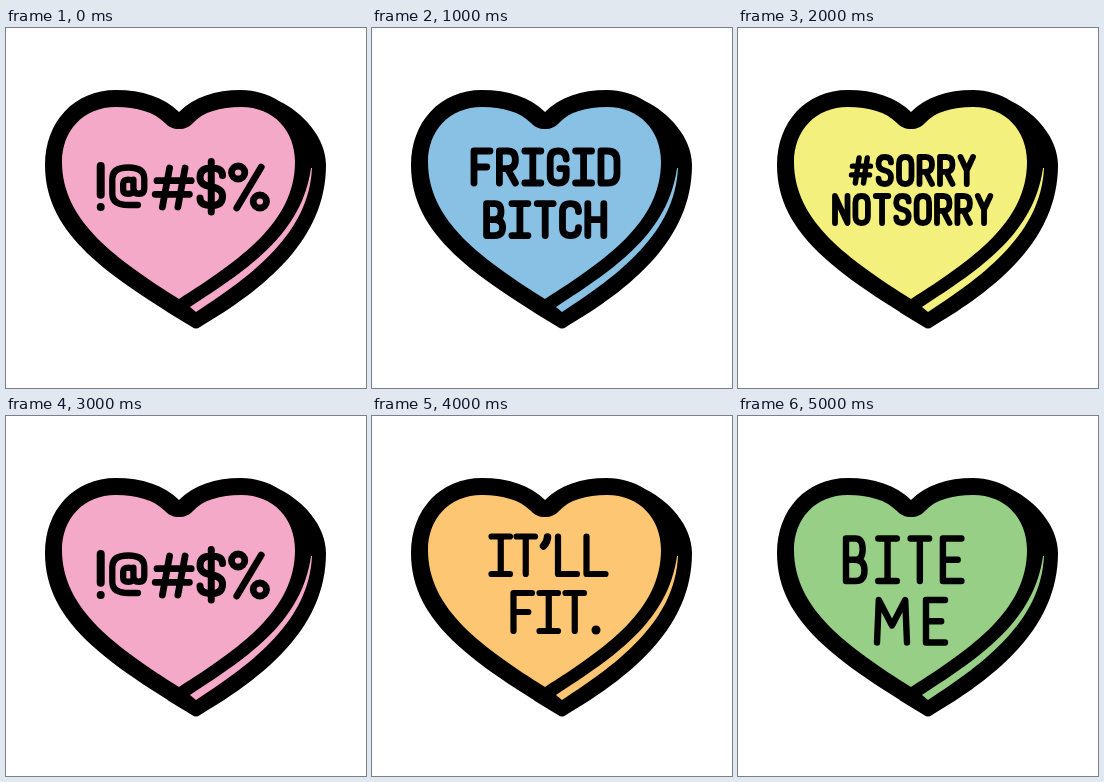
An HTML page for the animation above (6 s loop, 360 by 360 pixels).

```html
<!DOCTYPE html>
<html lang="en">
<head>
<meta charset="utf-8">
<title>Candy hearts</title>
<style>
  html, body { margin: 0; width: 100%; height: 100%; overflow: hidden; background: #fff; }
  svg { display: block; width: 100%; height: 100%; }
  #words path { fill: none; stroke: #000; stroke-linecap: round; stroke-linejoin: round; vector-effect: non-scaling-stroke; }
</style>
</head>
<body>
<svg viewBox="0 0 360 360" role="img">
  <path d="M173 84C188 69 209 62 235 62C249 62 262 66 273 73C296 84 320 109 320 137C320 211 260 260 194 299Q190 302 186 299C105 249 39 208 39 137C39 94 68 62 110 62C136 62 158 69 173 84Z"/>
  <g id="candy">
    <path d="M173 101C167 101 163 99 159 95C148 84 131 79 110 79C77 79 56 103 56 134C56 194 112 232 173 271C234 232 289 194 289 134C289 103 268 79 235 79C214 79 197 84 187 95C183 99 179 101 173 101Z"/>
    <path d="M184 279L190 284C249 246 303 204 306 140H305C296 204 246 239 184 279Z"/>
  </g>
  <g id="words"></g>
</svg>
<script>
// Rounded single-line alphabet; each letter fills a 10 by 20 box.
const S = 'M10 4Q10 0 5 0T0 5Q0 9 5 10T10 15Q10 20 5 20T0 16';
const glyphs = {
  B: 'M0 10H5Q10 10 10 15T5 20H0V0H5Q9 0 9 5T5 10',
  C: 'M10 5Q10 0 5 0T0 5V15Q0 20 5 20T10 15',
  D: 'M0 0V20H4Q10 20 10 14V6Q10 0 4 0Z',
  E: 'M10 0H0V20H10M0 10H8',
  F: 'M0 20V0H10M0 10H8',
  G: 'M10 5Q10 0 5 0T0 5V15Q0 20 5 20T10 15V11H6',
  H: 'M0 0V20M10 0V20M0 10H10',
  I: 'M0 0H10M0 20H10M5 0V20',
  L: 'M0 0V20H10',
  M: 'M0 20L.6 0L5 12L9.4 0L10 20',
  N: 'M0 20V0L10 20V0',
  O: 'M0 5Q0 0 5 0T10 5V15Q10 20 5 20T0 15Z',
  R: 'M0 20V0H5Q10 0 10 5.5T5 11H0M5 11L10 20',
  S,
  T: 'M0 0H10M5 0V20',
  Y: 'M0 0L5 10L10 0M5 10V20',
  '!': 'M5 0V14M5 20h.01',
  '@': 'M8 20H5Q0 20 0 14V6Q0 0 5 0T10 6V11Q10 14 8.3 14T6.6 11V6.5M6.6 8.5Q6.6 6.5 5 6.5T3.4 8.5V12Q3.4 14 5 14T6.6 12',
  '#': 'M4 0L2 20M8.3 0L6.3 20M.5 6.5H10M0 13.5H9.5',
  '$': S + 'M5 -3.5V23.5',
  '%': 'M0 3.1a1.9 3.1 0 1 0 3.8 0a1.9 3.1 0 1 0-3.8 0M10 16.9a1.9 3.1 0 1 1-3.8 0a1.9 3.1 0 1 1 3.8 0M8.5 .5L1.5 20',
  '’': 'M7 0Q7 10 3 20',
  '.': 'M5 20h.01'
};

// Letters of one size: left and top of the first box, box size, pitch, line weight.
const row = (text, x, y, w, h, pitch, weight) =>
  [...text].map((letter, i) =>
    `<path d="${glyphs[letter]}" stroke-width="${weight}" transform="translate(${x + i * pitch} ${y}) scale(${w / 10} ${h / 20})"/>`
  ).join('');

const swear = {
  color: '#f4a9c9', label: '!@#$%',
  art: row('!', 89.7, 138, 10, 41, 0, 8) + row('@', 106.3, 139.5, 32, 37.5, 0, 6.3) +
       row('#', 149.2, 140, 36, 39, 0, 6.8) + row('$', 194, 140, 22.5, 37.5, 0, 7) +
       row('%', 225.5, 138, 35, 42, 0, 6.8)
};
const hearts = [
  swear,
  { color: '#88c1e4', label: 'FRIGID BITCH',
    art: row('FRIGID', 102, 123, 16, 32, 25.4, 6.8) + row('BITCH', 114.6, 175.6, 16, 32, 25.3, 6.8) },
  { color: '#f4f07d', label: '#SORRY NOTSORRY',
    art: row('#', 113.5, 130, 19, 25, 0, 5.4) + row('SORRY', 140.5, 129, 12.5, 27, 20.5, 5.8) +
         row('NOTSORRY', 97, 168, 12.5, 27, 20.4, 5.8) },
  swear,
  { color: '#fdc673', label: 'IT’LL FIT.',
    art: row('IT', 119.5, 120.5, 18.5, 37.5, 25, 6.2) + row('’', 168.5, 121, 10, 9, 0, 7.5) +
         row('LL', 186, 120.5, 19, 37.5, 28.5, 6.2) +
         row('FIT', 141.5, 177, 18.5, 38, 26, 6.2) + row('.', 219, 177, 10, 37, 0, 9) },
  { color: '#98cf87', label: 'BITE ME',
    art: row('BITE', 108, 122.5, 18.5, 42.5, 32.3, 6.4) + row('M', 139, 184, 30, 42.5, 0, 6.4) +
         row('E', 188, 184, 19, 42.5, 0, 6.4) }
];

const svg = document.querySelector('svg');
const candy = document.getElementById('candy');
const words = document.getElementById('words');
let shown = -1;

function draw() {
  const index = Math.floor(performance.now() / 1000) % hearts.length;
  if (index !== shown) {
    const { color, label, art } = hearts[index];
    candy.setAttribute('fill', color);
    svg.setAttribute('aria-label', label);
    words.innerHTML = art;
    shown = index;
  }
  requestAnimationFrame(draw);
}
draw();
</script>
</body>
</html>
```
